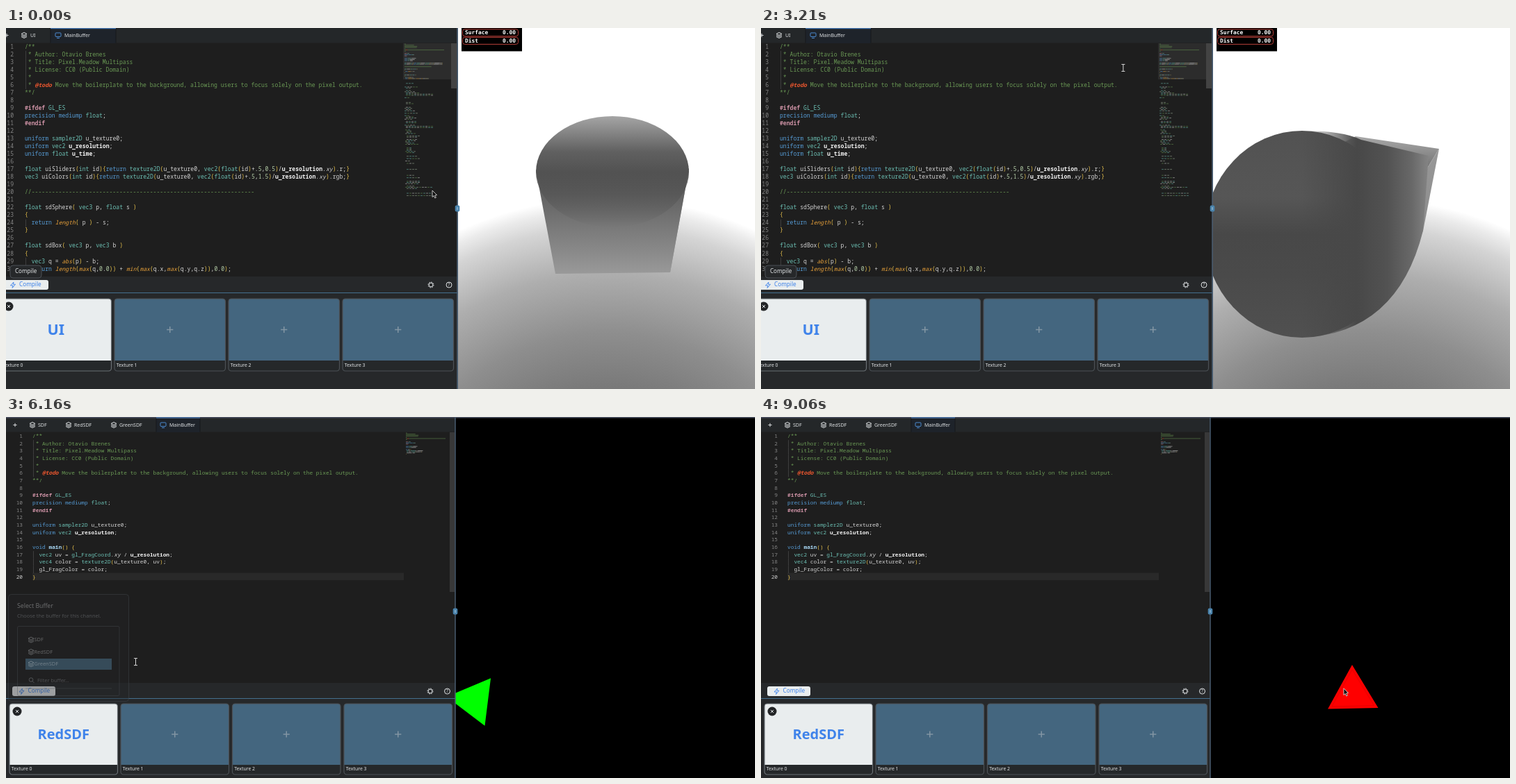
Recreate the animation shown at these times as an HTML page with a canvas. Size 1077 by 520 pixels, loop 9.13 s.

```html
<!DOCTYPE html>
<html lang="en">
<head>
<meta charset="utf-8">
<title>Shader editor</title>
<style>
html, body { margin: 0; width: 100%; height: 100%; overflow: hidden; background: #1e1e1e; }
canvas { display: block; width: 1077px; height: 520px; }
</style>
</head>
<body>
<canvas id="stage" width="1077" height="520"></canvas>
<script>
const g = document.getElementById('stage').getContext('2d');
const W = 1077, H = 520, LOOP = 9130, CUT = 3300;
const SANS = '"Noto Sans", sans-serif', MONO = '"Noto Sans Mono", monospace';
const BLUE = '#3f83ea', PALE = '#e9edee', GREEN = '#6a9955', EDGE = '#4c5156';

const HEAD = `/**
 * Author: Otavio Brenes
 * Title: Pixel.Meadow Multipass
 * License: CC0 (Public Domain)
 *
 * @todo Move the boilerplate to the background, allowing users to focus solely on the pixel output.
**/

#ifdef GL_ES
precision mediump float;
#endif

uniform sampler2D u_texture0;
uniform vec2 u_resolution;
`;
const LONG = HEAD + `uniform float u_time;

float uiSliders(int id){return texture2D(u_texture0, vec2(float(id)+.5,0.5)/u_resolution.xy).r;}
vec3 uiColors(int id){return texture2D(u_texture0, vec2(float(id)+.5,1.5)/u_resolution.xy).rgb;}

//${'-'.repeat(66)}

float sdSphere( vec3 p, float s )
{
  return length( p ) - s;
}

float sdBox( vec3 p, vec3 b )
{
  vec3 q = abs(p) - b;
  return length(max(q,0.0)) + min(max(q.x,max(q.y,q.z)),0.0);`;
const SHORT = HEAD + `
void main() {
  vec2 uv = gl_FragCoord.xy / u_resolution;
  vec4 color = texture2D(u_texture0, uv);
  gl_FragColor = color;
}`;

const STYLES = [
  [/^@todo$/, '#f0582f', 'italic bold'],
  [/^#/, '#cf93a6', 'bold'],
  [/^(uniform|precision|mediump|return|void)$/, '#569cd6', ''],
  [/^(float|int|vec\d|sampler2D|texture2D|GL_ES|gl_FragCoord)$/, '#6cc0b4', ''],
  [/^(length|max|min|abs)$/, '#e8a13a', 'italic'],
  [/^(u_resolution|u_time)$/, '#f2f2f2', 'bold'],
  [/^main$/, '#a9d8f5', 'bold'],
  [/^xy$/, '#d4d4d4', 'italic'],
  [/^\d/, '#b5cea8', ''],
  [/^[(){}]$/, '#e6c04c', ''],
  [/./, '#d4d4d4', '']
];

// Splits a line into [word, column, colour, style].
function tokens(line) {
  const comment = /^(\/[/*]| \*|\*\*)/.test(line);
  const words = line.matchAll(comment ? /@todo|[^@]+/g : /\s+|#?\w+|[^\w\s]/g);
  return [...words].map(m => {
    const [, color, style] = STYLES.find(s => s[0].test(m[0]));
    return [m[0], m.index, comment && m[0] !== '@todo' ? GREEN : color, style];
  });
}

const A = {
  lines: LONG.split('\n').map(tokens), x: 27, y: 27.4, lh: 11.03, size: 8.108, num: 11,
  split: 649, tools: 358, panel: 381, cardY: 390, cardH: 104, strip: 15, cardX: [-8, 156, 320, 484], cardW: 159.5,
  plusX: 1, tabY: 10.5, tabs: [['UI', 26, 35], ['MainBuffer', 75, 84]], active: [64, 158],
  button: [-6, 363, 67], gear: 611, help: 637, close: [4, 401], grip: 260, mapX: 573
};
const B = {
  lines: SHORT.split('\n').map(tokens), x: 38, y: 27.8, lh: 10.66, size: 7.82, num: 24,
  split: 646, tools: 383, panel: 405, cardY: 413, cardH: 102, strip: 14, cardX: [5, 165, 325.5, 486], cardW: 155.5,
  plusX: 13, tabY: 11.5, tabs: [['SDF', 38, 46], ['RedSDF', 90, 98], ['GreenSDF', 155, 163], ['MainBuffer', 226, 235]],
  active: [216, 279], button: [9, 388, 62], gear: 610, help: 634.5, close: [16, 424], grip: 280, mapX: 575
};

// Pointer way points: time, x, y.
const WAY = [
  [0, 613, 234], [230, 613, 234], [1730, 590, 232], [2560, 585, 222], [3210, 521, 57], [3300, 508, 45],
  [3301, 800, 180], [3650, 770, 400], [3850, 880, 350], [4030, 947, 264], [4110, 948, 262], [4400, 885, 310],
  [4700, 673, 408], [5000, 82, 455], [5150, 82, 455], [5550, 60, 338], [5960, 58, 338], [6160, 187, 352],
  [6420, 45, 393], [6620, 43, 393], [6800, 673, 408], [7060, 897, 215], [7400, 897, 215], [7510, 912, 180],
  [7590, 868, 160], [7900, 725, 115], [8250, 790, 300], [8600, 955, 430], [8980, 851, 399], [9060, 838, 391], [9130, 830, 386]
];

const clamp = (v, a = 0, b = 1) => Math.min(b, Math.max(a, v));
const mix = (a, b, k) => a.map((v, i) => v + (b[i] - v) * k);
const gray = (v, a = 1) => `rgba(${v},${v},${v},${a})`;

function sample(keys, t) {
  const next = keys.findIndex(k => k[0] > t);
  const i = next < 0 ? keys.length - 1 : Math.max(1, next);
  const [p, q] = [keys[i - 1], keys[i]];
  return mix(p, q, clamp((t - p[0]) / (q[0] - p[0]))).slice(1);
}

function rect(x, y, w, h, color) { g.fillStyle = color; g.fillRect(x, y, w, h); }
function round(x, y, w, h, r, fill, stroke, width = 1) {
  g.beginPath(); g.roundRect(x, y, w, h, r);
  if (fill) { g.fillStyle = fill; g.fill(); }
  if (stroke) { g.strokeStyle = stroke; g.lineWidth = width; g.stroke(); }
}
function trace(pts, closed) {
  g.beginPath();
  for (let i = 0; i < pts.length; i += 2) g.lineTo(pts[i], pts[i + 1]);
  if (closed) g.closePath();
}
function line(color, width, ...pts) { trace(pts); g.strokeStyle = color; g.lineWidth = width; g.stroke(); }
function poly(fill, pts) { trace(pts, true); g.fillStyle = fill; g.fill(); }
function disc(x, y, r, fill, stroke) {
  g.beginPath(); g.arc(x, y, r, 0, 7);
  if (fill) { g.fillStyle = fill; g.fill(); }
  if (stroke) { g.strokeStyle = stroke; g.lineWidth = 1; g.stroke(); }
}
function text(s, x, y, size, color, style = '', align = 'left', family = SANS) {
  g.font = `${style} ${size}px ${family}`;
  g.textAlign = align; g.textBaseline = 'middle'; g.fillStyle = color;
  g.fillText(s, x, y);
}
function shade(x0, y0, x1, y1, ...stops) {
  const s = g.createLinearGradient(x0, y0, x1, y1);
  stops.forEach(([at, color]) => s.addColorStop(at, color));
  return s;
}
function plus(x, y, r, color, width) {
  line(color, width, x - r, y, x + r, y);
  line(color, width, x, y - r, x, y + r);
}
function layers(x, y, color) {
  trace([x - 4, y - 2, x, y - 4, x + 4, y - 2, x, y], true);
  g.strokeStyle = color; g.lineWidth = 1; g.stroke();
  for (const d of [0, 2]) line(color, 1, x - 4, y + d, x, y + 2 + d, x + 4, y + d);
}

function minimap(S) {
  const step = S === A ? 1.72 : 1.6;
  g.globalAlpha = 0.5;
  S.lines.forEach((row, i) => row.forEach(([word, col, color]) => {
    if (word.trim()) rect(S.mapX + col * 0.57, 22.5 + i * step, word.length * 0.57, 1, color);
  }));
  if (S === A) {
    let seed = 11;
    const rnd = () => (seed = seed * 16807 % 2147483647) / 2147483647;
    const colors = ['#d4d4d4', '#6cc0b4', GREEN, '#a5b8a0'];
    for (let i = 31; i < 129; i++) {
      const kind = rnd(), indent = (i % 9 && rnd() > 0.3 ? 2 : 0) + (i > 70 ? 1 : 0);
      if (kind < 0.4) continue;
      const length = kind > 0.95 || i > 124 ? 40 : 4 + rnd() * 15;
      for (let x = 0; x < length; x += 4) rect(S.mapX + indent + x, 22.5 + i * step, 3, 1, colors[rnd() * 4 | 0]);
    }
  }
  g.globalAlpha = 1;
}

function code(S) {
  if (S === B) rect(38, 224.5, 534, 10.5, '#292929');
  S.lines.forEach((row, i) => {
    const y = S.y + i * S.lh;
    text(i + 1, S.num, y, S.size, S === B && i === 19 ? '#d0d0d0' : '#858585', '', 'right', MONO);
    if (row[0] && /^ /.test(row[0][0])) rect(S.x + 1, y - S.lh / 2, 0.8, S.lh, '#454545');
    for (const [word, col, color, style] of row)
      if (word.trim()) text(word, S.x + col * S.size * 0.6, y, S.size, color, style, 'left', MONO);
  });
}

function editor(S, label, t) {
  const { split, tools, panel, cardY, cardH, strip, cardW, tabY } = S;
  rect(0, 0, split, H, '#1e1e1e');
  rect(0, 0, split, 21.5, '#242729');
  rect(S.active[0], 0, S.active[1] - S.active[0], 22, '#1e232a');
  for (const x of S.active) rect(x - 0.5, 0, 1, 21.5, '#17191b');
  if (S === B) rect(0, 0, W, 1.5, '#4a5060');
  rect(S.active[0], S === B ? 0.5 : 0, S.active[1] - S.active[0], 1.2, '#4d80bd');
  plus(S.plusX, tabY, 2.6, '#d5d8da', 1);
  S.tabs.forEach(([name, ix, tx], i) => {
    if (i < S.tabs.length - 1) layers(ix, tabY, '#dfe2e4');
    else {
      round(ix - 4, tabY - 3.5, 8, 5.5, 1, null, '#4b8ad0');
      line('#4b8ad0', 1, ix - 2, tabY + 4, ix + 2, tabY + 4);
    }
    text(name, tx, tabY, 7, '#dfe2e4');
  });

  if (S === A) {
    rect(571, 22, 69, 52, '#2c2c2c');
    rect(640, 22, 8, 65, '#434343');
  } else if (t > 4700) rect(638, 22, 7, 230, '#383838');
  minimap(S);
  code(S);

  rect(0, tools, split, H - tools, '#26282a');
  rect(0, panel, split, 1, '#44708f');
  const by = S.button[1], mid = by + 7;
  round(S.button[0], by, S.button[2], 14, 3, PALE);
  const bx = S.button[0] + 13.5 + (S === A ? 2.5 : 0);
  line(BLUE, 0.9, bx + 1, mid - 4, bx - 3.5, mid + 1, bx, mid + 1, bx - 1, mid + 4.5, bx + 3.5, mid - 0.8, bx + 0.3, mid - 0.8, bx + 1, mid - 4);
  text('Compile', bx + 9, mid, 8.2, BLUE);
  g.setLineDash([1.6, 1.5]); disc(S.gear, mid, 4, null, '#dfe2e4'); g.setLineDash([]);
  disc(S.gear, mid, 2.9, null, '#dfe2e4');
  disc(S.help, mid, 4, null, '#dfe2e4');
  text('?', S.help, mid, 6.5, '#dfe2e4', '', 'center');

  S.cardX.forEach((x, i) => {
    const cy = cardY + (cardH - strip) / 2, cx = x + cardW / 2;
    round(x, cardY, cardW, cardH, 4, '#25282a');
    round(x, cardY, cardW, cardH - strip, [4, 4, 0, 0], i ? '#44667f' : PALE);
    round(x, cardY, cardW, cardH, 4, null, i ? EDGE : '#6a7075', 1.2);
    if (i) plus(cx, cy, 4.6, '#8295a3', 1.5);
    else text(label, cx, cy + 1, S === A ? 21.5 : 20, BLUE, 'bold', 'center');
    text('Texture ' + i, x + 2.7, cardY + cardH - strip / 2 - 0.5, 6.9, '#e2e5e7');
  });
  const [cx, cy] = S.close;
  disc(cx, cy, 6.5, '#232527');
  line('#e2e5e7', 1, cx - 2, cy - 2, cx + 2, cy + 2);
  line('#e2e5e7', 1, cx + 2, cy - 2, cx - 2, cy + 2);
}

function splitter(S) {
  rect(S.split - 0.7, 0, 1.4, H, '#4c6075');
  round(S.split - 3.3, S.grip - 4.5, 6.6, 9, 2, '#4a83ab');
  line('#cfe0ec', 0.8, S.split, S.grip - 2, S.split, S.grip + 2);
}

// Scene solids. Box corners: front left, back left, back right, front right (top),
// front right, front left, back right (bottom).
const BOX = [
  [230, 762, 205, 803, 158, 941, 158, 982, 203, 955, 352, 790, 354, 955, 340],
  [1730, 752, 190, 835, 157, 956, 166, 943, 203, 920, 366, 780, 325, 928, 325],
  [3210, 770, 200, 855, 156, 975, 174, 950, 215, 905, 385, 790, 340, 952, 292]
];
// Ball: x, y, width radius, height radius, top tone, tone, lower opacity, bridge to box.
const BALL = [
  [230, 872, 207, 110, 80, 165, 82, 0, 0],
  [1730, 637, 556, 186, 186, 62, 52, 1, 0],
  [3210, 778, 297, 140, 149, 82, 72, 1, 1]
];
const FACE = [[230, 80, 152], [1730, 104, 166], [3210, 88, 130]];

function solids(t) {
  const c = sample(BOX, t), [x, y, rx, ry, top, tone, low, bridge] = sample(BALL, t);
  const [near, far] = sample(FACE, t), pick = (...ids) => ids.flatMap(i => [c[2 * i], c[2 * i + 1]]);
  rect(650, 0, W - 650, H, '#fff');
  const ground = g.createRadialGradient(865, 760, 230, 865, 760, 515);
  [[0, 118], [0.32, 142], [0.62, 174], [0.85, 212], [0.94, 235], [1, 255]].forEach(([k, v]) => ground.addColorStop(k, gray(v)));
  rect(650, 240, W - 650, H - 240, ground);
  poly(shade(0, c[3], 0, c[7], [0, gray(168)], [1, gray(near + 12)]), pick(0, 1, 2, 3));
  poly(shade(0, c[5], 0, c[9], [0, gray(152)], [1, gray(far)]), pick(3, 2, 6, 4));
  poly(shade(0, c[7], 0, c[9], [0, gray(near)], [1, gray(far)]), pick(0, 3, 4, 5));

  g.beginPath(); g.ellipse(x, y, rx, ry, 0, 0, 7);
  g.fillStyle = shade(0, y - ry, 0, y + ry, [0, gray(top)], [0.32, gray(tone + 14)], [0.5, gray(tone)], [0.7, gray(tone + 2, 0.7 + low * 0.3)], [1, gray(tone + 8, low)]);
  g.fill();

  // Smooth blend from the ball into the box.
  const k = clamp(bridge * 2 - 1);
  if (k) {
    const [ex, ey] = pick(4), [gx, gy] = pick(6);
    g.globalAlpha = k;
    g.beginPath();
    g.moveTo(x, y - ry);
    g.quadraticCurveTo(x + rx * 0.42, y - ry, c[2] + 8, c[3] + 5);
    g.lineTo(c[4] - 15, c[5] + 10);
    g.lineTo(gx, gy);
    g.quadraticCurveTo(ex + 10, ey + 55, x, y + ry);
    g.fillStyle = shade(x, 0, c[4], 0, [0, gray(tone, 0)], [0.4, gray(tone)], [0.62, gray(tone + 10)], [0.8, gray(104)], [1, gray(150)]);
    g.fill();
    g.globalAlpha = 1;
  }
}

function readout() {
  rect(655, 0, 87, 33.5, '#000');
  ['Surface', 'Dist'].forEach((name, i) => {
    const y = 6.8 + i * 11.6;
    round(656.5, y - 5, 80, 10, 3, null, '#b8403a');
    text(name, 660, y + 0.3, 7.9, '#fff', 'bold', 'left', '"DejaVu Sans Mono", monospace');
    text('0.00', 733, y + 0.3, 7.9, '#fff', 'bold', 'right', '"DejaVu Sans Mono", monospace');
  });
}

function tooltip() {
  round(6, 342, 45, 18, 4, '#26282a', EDGE);
  text('Compile', 13, 351, 8.1, '#e2e5e7');
}

function triangle(t) {
  const red = t >= 6640;
  let u = t - 80;
  if (u > 4700 && u < 6800) u = 4700;
  const [x, y] = sample(WAY, u < CUT ? CUT + 1 : u);
  const turn = (red ? -91.2 : -100 + (t - 4110) * 0.0815) * Math.PI / 180;
  const ring = r => [0, 1, 2].flatMap(i => [x + r * Math.cos(turn + i * 2.0944), y + r * Math.sin(turn + i * 2.0944)]);
  poly(red ? '#f00' : '#0f0', ring(red ? 41.8 : 39.8));
  if (red) { trace(ring(35), true); g.strokeStyle = '#e60000'; g.lineWidth = 1; g.stroke(); }
}

function popup(t) {
  const a = Math.min(clamp((t - 5060) / 120), clamp(1 - (t - 6050) / 180));
  if (!a) return;
  g.globalAlpha = a;
  round(3.5, 255.5, 173, 154, 4, '#222426', EDGE);
  text('Select Buffer', 16, 272.5, 8.7, '#e2e5e7');
  text('Choose the buffer for this channel.', 16, 287, 7.4, '#9aa0a5');
  round(16.5, 301.5, 146.5, 100, 2, null, EDGE);
  rect(28, 348, 124, 16, '#5a90b5');
  ['SDF', 'RedSDF', 'GreenSDF'].forEach((name, i) => {
    const y = 321 + i * 17.4;
    layers(36, y, '#c5cacd');
    text(name, 40.5, y, 7.4, '#d5d9db');
  });
  disc(36, 378.5, 2.8, null, '#9aa0a5');
  line('#9aa0a5', 1, 38, 380.5, 40.5, 383);
  text('Filter buffer...', 45, 379.5, 7.4, '#9aa0a5');
  line(EDGE, 1, 28, 391, 152, 391);
  g.globalAlpha = 1;
}

function pointer(S, t) {
  const [x, y] = sample(WAY, t);
  const overPopup = S === B && t > 5060 && t < 6050 && x < 177 && y > 255;
  if (x < 570 && y > 22 && y < S.tools && !overPopup) {
    for (const [color, w] of [['#111', 2.4], ['#e8e8e8', 1]]) {
      line(color, w, x, y - 4, x, y + 5);
      for (const d of [-4.5, 5.5]) line(color, w, x - 2.5, y + d, x + 2.5, y + d);
    }
    return;
  }
  const tip = [0, 0, 0, 9.5, 2.2, 7.6, 3.8, 11, 5.4, 10.2, 3.8, 7, 6.6, 6.6].map((v, i) => v + (i % 2 ? y : x));
  poly('#111', tip);
  g.strokeStyle = '#e8e8e8'; g.lineWidth = 0.8; g.stroke();
}

function draw(t) {
  if (t < CUT) {
    solids(t);
    readout();
    editor(A, 'UI', t);
    tooltip();
    splitter(A);
    pointer(A, t);
  } else {
    rect(0, 0, W, H, '#000');
    triangle(t);
    editor(B, t < 5960 ? 'GreenSDF' : 'RedSDF', t);
    popup(t);
    splitter(B);
    pointer(B, t);
  }
}

const start = performance.now();
function tick() {
  draw((performance.now() - start) % LOOP);
  requestAnimationFrame(tick);
}
tick();
</script>
</body>
</html>
```
